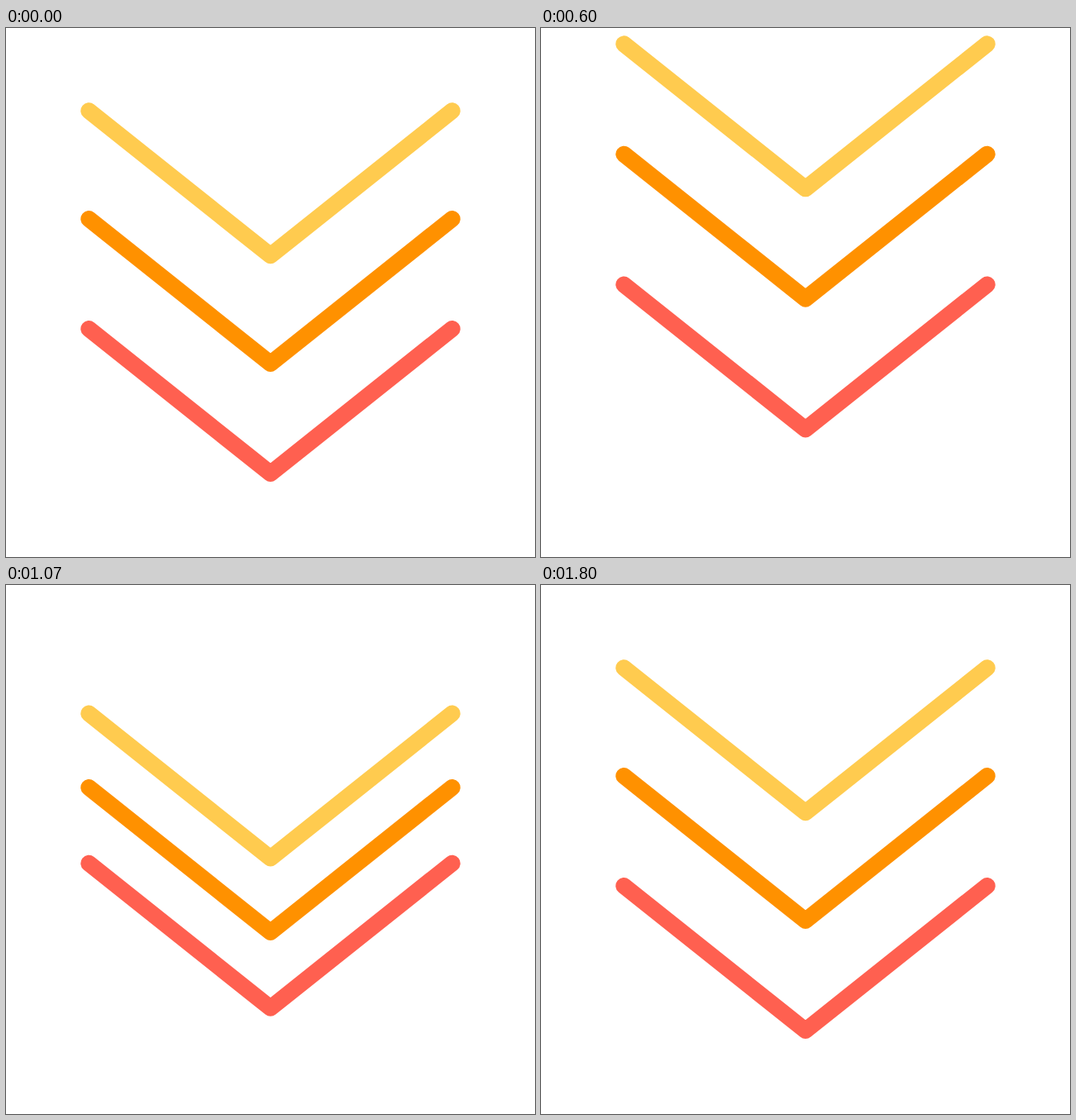
Animation of 640x640 px, one loop 2 s. Source, as an HTML page:

```html
<!DOCTYPE html>
<html lang="en">
<head>
<meta charset="utf-8">
<title>Bouncing chevrons</title>
<style>
  html, body { margin: 0; width: 100%; height: 100%; overflow: hidden; background: #fff; }
  svg { display: block; width: 100%; height: 100%; }
  path { fill: none; stroke-width: 20; stroke-linecap: round; stroke-linejoin: round; }
</style>
</head>
<body>
<svg viewBox="0 0 640 640"></svg>
<script>
const LOOP = 2000, FPS = 30;

// Resting height, colour and lead (in ticks) of each chevron.
const chevrons = [
  { y: 100.3, color: '#ffcb4f', lead: 0 },
  { y: 231, color: '#ff9100', lead: 2 },
  { y: 364, color: '#ff6050', lead: 4 }
];

// Shared bounce: [tick, vertical offset].
const keys = [[4, 0], [19, -82], [30, 74], [38, -46], [46, 59], [54, 0]];

const svg = document.querySelector('svg');
for (const c of chevrons) {
  c.path = document.createElementNS(svg.namespaceURI, 'path');
  c.path.setAttribute('d', `M100.3 ${c.y}l219.7 175 219.7-175`);
  c.path.setAttribute('stroke', c.color);
  svg.append(c.path);
}

const smooth = u => u * u * (3 - 2 * u);
// The last move settles a little faster.
const settle = u => smooth(u + 0.65 * u * u * (1 - u));

function offset(tick) {
  const i = keys.findIndex(k => tick < k[0]);
  if (i < 1) return 0;
  const [t0, y0] = keys[i - 1], [t1, y1] = keys[i];
  const ease = i === keys.length - 1 ? settle : smooth;
  return y0 + (y1 - y0) * ease((tick - t0) / (t1 - t0));
}

function draw(ms) {
  const tick = Math.floor((ms % LOOP + 4) * FPS / 1000);
  for (const c of chevrons)
    c.path.setAttribute('transform', `translate(0 ${offset(tick + c.lead)})`);
}

const start = performance.now();
function frame() {
  draw(performance.now() - start);
  requestAnimationFrame(frame);
}
frame();
</script>
</body>
</html>
```
